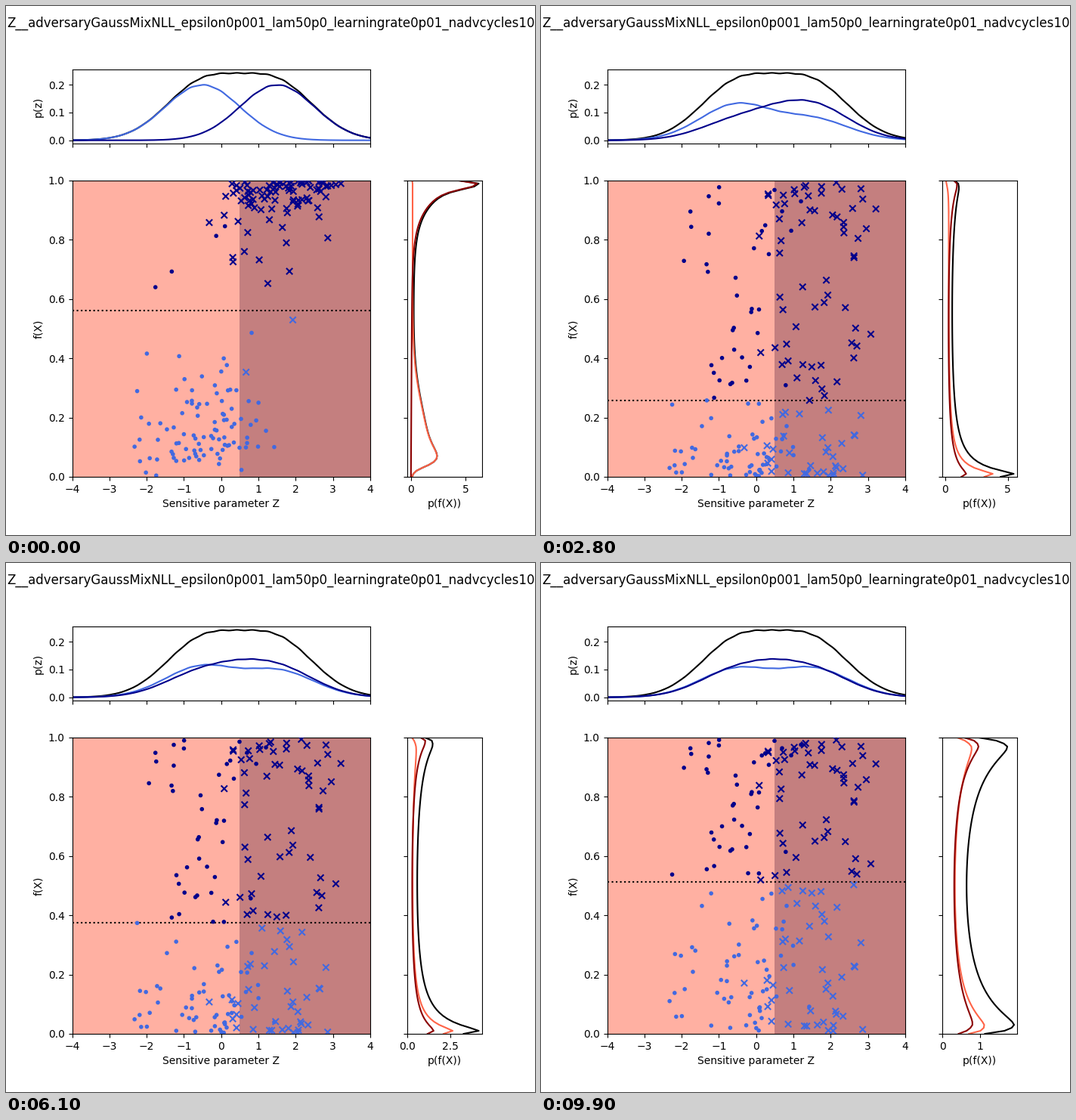
Animation, 700 px wide and 700 px high, one loop 10 s. Source, as a matplotlib script:

```python
import numpy as np
import matplotlib.pyplot as plt
from matplotlib.animation import FuncAnimation

plt.rcParams["text.kerning_factor"] = 6

FRAMES = 100
TITLE = ("Z__adversaryGaussMixNLL_epsilon0p001_lam50p0"
         "_learningrate0p01_nadvcycles10")
# frame, cut, share of the upper class below the cut,
# logit mean and spread of the score for low z, then for high z
POSE = np.array([
    [0, .560, .000, -1.85, .80, 3.1, 1.05],
    [8, .155, .316, -1.90, 1.20, -.9, 1.65],
    [28, .258, .375, -1.50, 2.20, -.3, 2.40],
    [41, .190, .525, -1.50, 2.70, -1.5, 2.70],
    [61, .375, .475, -.90, 2.30, -.2, 2.40],
    [85, .427, .490, -.60, 2.10, -.3, 2.10],
    [99, .513, .520, -.20, 2.10, .1, 2.10],
]).T
LOBE, WIDTH = .70, .71  # two-lobed unit distribution of the logit
rng = np.random.default_rng(11)


def normal(x, mean=0, sd=1):
    return np.exp(-((x - mean) / sd) ** 2 / 2) / (sd * np.sqrt(2 * np.pi))


def logit(p):
    return np.log(p / (1 - p))


def sigmoid(x):
    return 1 / (1 + np.exp(-x))


# density of z and the weight of the upper class in it
z = np.linspace(-4, 4, 161)
pz = (normal(z, -.5) + normal(z, 1.5)) / 2 * (1 + .005 * np.cos(15 * z))
upper = sigmoid(2 * (z - .5))


def share_below(c):
    """Fraction of p(z) below the cut, dipping where the classes overlap."""
    lower_c = 1 - .93 * c
    dip = .35 * (1 - lower_c + c) * upper * (1 - upper)
    return lower_c * (1 - upper) + c * upper - dip


f = np.linspace(0, 1, 100)
f_in = np.clip(f, .008, .992)


def score_density(mean, spread, mass, floor):
    lobes = sum(normal(logit(f_in), mean + side * LOBE * spread, WIDTH * spread)
                for side in (-1, 1)) / 2
    p = mass * lobes / (f_in * (1 - f_in)) + floor
    return np.convolve(p, [.25, .5, .25], mode="same")


class Cloud:
    """Samples with fixed z whose scores follow the moving distribution."""

    def __init__(self, ax, count, mean, sd, tilt, **style):
        self.z = rng.normal(mean, sd, count)
        self.first = rng.standard_t(4, count) + tilt * (self.z - mean)
        side = np.where(np.arange(count) % 2, 1, -1)
        self.last = LOBE * side + WIDTH * rng.normal(size=count)
        self.marks = ax.scatter(self.z, self.z, s=36, zorder=3, **style)

    def move(self, mean, spread, turn, cut):
        latent = np.cos(turn) * self.first + np.sin(turn) * self.last
        score = sigmoid(mean + spread * latent)
        self.marks.set_offsets(np.column_stack([self.z, score]))
        self.marks.set_color(["darkblue" if s > cut else "royalblue"
                              for s in score])


fig = plt.figure(figsize=(7, 7), dpi=100)
grid = fig.add_gridspec(2, 2, width_ratios=[4, 1], height_ratios=[1, 4])
main = fig.add_subplot(grid[1, 0])
top = fig.add_subplot(grid[0, 0], sharex=main)
side = fig.add_subplot(grid[1, 1], sharey=main)
top.tick_params(labelbottom=False)
side.tick_params(labelleft=False)
fig.suptitle(TITLE)

main.set(xlim=(-4, 4), ylim=(0, 1), xlabel="Sensitive parameter Z", ylabel="f(X)")
for lo, hi, color in ((-4, .49, "tomato"), (.49, 4, "darkred")):
    main.axvspan(lo, hi, color=color, alpha=.5, lw=0, antialiased=False)
cut_line = main.axhline(.5, color="black", ls=":")
dots = Cloud(main, 98, -.5, .95, 0, marker=".", lw=1)
crosses = Cloud(main, 95, 1.6, .95, .6, marker="x", lw=1.5)

top.set_ylabel("p(z)")
top.plot(z, pz, color="black")
below, = top.plot(z, pz, color="royalblue")
above, = top.plot(z, pz, color="darkblue")

side.set_xlabel("p(f(X))")
side_lines = [side.plot(f, f, color=c)[0] for c in ("black", "tomato", "darkred")]


def update(frame):
    cut, c, low_m, low_s, high_m, high_s = (
        np.interp(frame, POSE[0], row) for row in POSE[1:])
    turn = np.pi / 2 * min(frame / 10, 1)
    floor = .15 * max(1 - frame / 8, 0)

    cut_line.set_ydata([cut, cut])
    dots.move(low_m, low_s, turn, cut)
    crosses.move(high_m, high_s, turn, cut)

    part = share_below(c)
    below.set_ydata(pz * part)
    above.set_ydata(pz * (1 - part))

    low = score_density(low_m, low_s, .5 - .6 * floor, floor)
    high = score_density(high_m, high_s, .47 - .6 * floor, floor * f)
    curves = (low + high, low, high)
    for line, curve in zip(side_lines, curves):
        line.set_xdata(curve)
    lo, hi = np.min(curves), np.max(curves)
    pad = .05 * (hi - lo)
    side.set_xlim(min(lo - pad, 0), hi + pad)


anim = FuncAnimation(fig, update, frames=FRAMES, interval=100,
                     init_func=lambda: update(0), repeat=True, repeat_delay=0)
plt.show()
```
